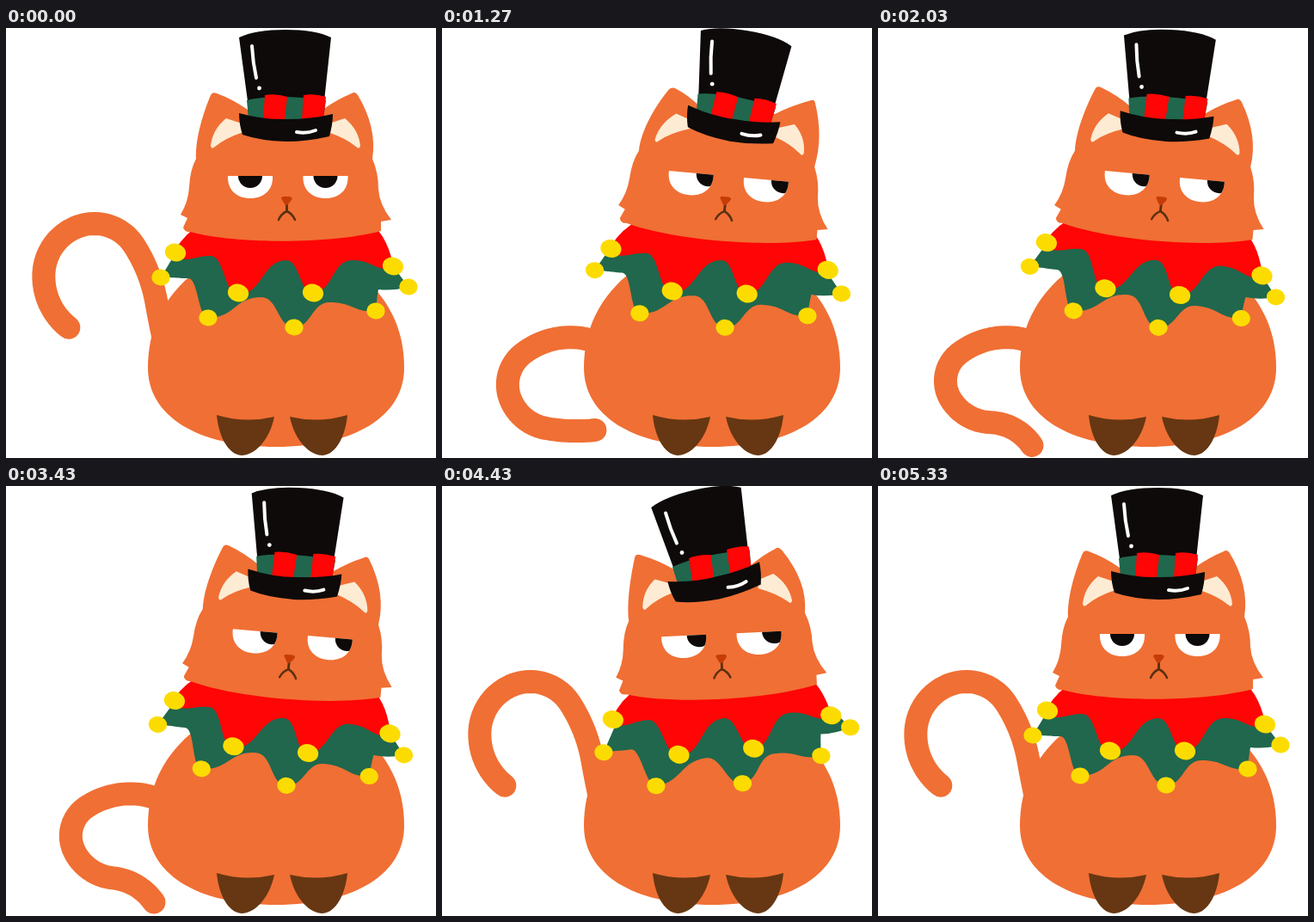
An HTML page with a canvas that plays this animation: 500x500 px, repeating every 5.86 s.

```html
<!DOCTYPE html>
<html lang="en">
<head>
<meta charset="utf-8">
<title>Grumpy festive cat</title>
<style>
  html, body { margin: 0; width: 100%; height: 100%; overflow: hidden; background: #fff; }
  canvas { display: block; width: 100vw; height: 100vh; }
</style>
</head>
<body>
<canvas id="stage" width="500" height="500"></canvas>
<script>
const ctx = document.getElementById('stage').getContext('2d');
const LOOP = 5860, STEP = 1900 / 27;
const ORANGE = '#f06f34', BLACK = '#0d0a09', RED = '#ff0505', GREEN = '#20674d',
      YELLOW = '#fcdc00', CREAM = '#fdebd3', BROWN = '#663712', NOSE = '#c63c06', MOUTH = '#5a3010';

const mix = (a, b, u) => a + (b - a) * u;

// The motion is stepped and rests between its two halves.
function poseTime(t) {
  if (t < 570) return 0;
  if (t >= 2030 && t < 3430) return 2030;
  if (t >= 5330) return 5330;
  const start = t < 2030 ? 570 : 3430;
  return start + Math.floor((t - start + 4) / STEP) * STEP;
}

function poseAt(t) {
  const ramp = (from, to) => {
    const u = Math.min(1, Math.max(0, (t - from) / (to - from)));
    return u * u * (3 - 2 * u);
  };
  const bump = (from, peak, to) => ramp(from, peak) - ramp(peak, to);
  const look = ramp(500, 1200) - ramp(3360, 4230);
  const overshoot = bump(700, 1270, 1800);
  const rebound = bump(3900, 4430, 5330);
  const settle = ramp(3900, 4430);
  return {
    head: 5.2 * look - 2.7 * rebound,
    ears: 12 * overshoot - 7 * rebound,
    hatTilt: 2.8 * look + 6.9 * overshoot - 12.6 * rebound,
    hatX: 10.5 * look + 3.5 * overshoot - 9.5 * rebound,
    gaze: 20 * (ramp(500, 1200) - ramp(4200, 5200)),
    collarTop: 5.1 * (ramp(700, 2030) - settle) - 4.7 * rebound,
    collarHem: 4.9 * (ramp(500, 1770) - settle) - 8 * rebound,
    tailDrop: ramp(500, 1270) - ramp(3360, 3930),
    tailCurl: bump(600, 1270, 1770) + 0.4 * bump(3430, 3930, 4430),
    tailLength: 362 - 76 * (ramp(500, 900) - ramp(3430, 4100))
  };
}

const still = (x, y) => [x, y];
const mirror = axis => (x, y) => [2 * axis - x, y];
const chain = (first, second) => (x, y) => second(...first(x, y));
function turn(degrees, cx, cy) {
  const a = degrees * Math.PI / 180, c = Math.cos(a), s = Math.sin(a);
  return (x, y) => [cx + (x - cx) * c - (y - cy) * s, cy + (x - cx) * s + (y - cy) * c];
}

// Segments of 2, 4 or 6 numbers are lines, quadratics or cubics.
function trace(warp, start, ...segments) {
  ctx.beginPath();
  ctx.moveTo(...warp(...start));
  for (const s of segments) {
    const p = [];
    for (let i = 0; i < s.length; i += 2) p.push(...warp(s[i], s[i + 1]));
    if (p.length === 2) ctx.lineTo(...p);
    else if (p.length === 4) ctx.quadraticCurveTo(...p);
    else ctx.bezierCurveTo(...p);
  }
}
function fill(color, warp, ...path) {
  trace(warp, ...path);
  ctx.fillStyle = color;
  ctx.fill();
}
function stroke(color, width, warp, ...path) {
  trace(warp, ...path);
  ctx.strokeStyle = color;
  ctx.lineWidth = width;
  ctx.stroke();
}
function ellipse(color, x, y, rx, ry = rx, angle = 0) {
  ctx.beginPath();
  ctx.ellipse(x, y, rx, ry, angle, 0, 7);
  ctx.fillStyle = color;
  ctx.fill();
}

// S-curves through crests and dips, level at each of them.
const wave = points => points.slice(1).map(([x, y], i) => {
  const [px, py] = points[i], mid = (px + x) / 2;
  return [mid, py, mid, y, x, y];
});

// Headings in degrees, evenly spaced from base to tip.
const tailUp = [104, 100, 123, 199, 267, 322];
const tailDown = [142, 182, 218, 300, 358, 304];
const tipCurl = [0, 0, 0, -10, -8, 62];

function drawTail({ tailDrop, tailCurl, tailLength }) {
  const headings = tailUp.map((up, i) => mix(up, tailDown[i], tailDrop) + tailCurl * tipCurl[i]);
  const parts = headings.length - 1, count = 60;
  let x = mix(190, 200, tailDrop), y = mix(390, 377, tailDrop);
  const line = [[x, y]];
  for (let n = 0; n < count; n++) {
    const s = (n + 0.5) / count * parts, i = Math.floor(s);
    const a = mix(headings[i], headings[i + 1], s - i) * Math.PI / 180;
    x += Math.cos(a) * tailLength / count;
    y -= Math.sin(a) * tailLength / count;
    line.push([x, y]);
  }
  stroke(ORANGE, 27, still, ...line);
}

function drawBody() {
  for (const side of [still, mirror(314)])
    fill(ORANGE, side, [315, 270], [222, 282], [183, 312, 165, 350, 165, 395], [165, 450, 220, 487, 315, 487]);
  for (const side of [still, mirror(321)])
    fill(BROWN, side, [245, 450], [278, 460, 312, 452], [306, 481, 288, 497, 274, 497], [257, 496, 247, 472, 245, 450]);
}

function drawCollar({ collarTop, collarHem }) {
  const top = turn(collarTop, 326, 243), hem = turn(collarHem, 326, 243);
  const hemEdge = [[180, 290], [212, 291], [235, 337], [297, 313], [335, 348], [376, 319], [430, 330]];
  const redEdge = [[450, 281], [402, 270], [357, 308], [326, 270], [270, 310], [238, 265], [205, 269]];
  fill(GREEN, hem, [197, 262], hemEdge[0], ...wave(hemEdge), [431, 315, 433, 304],
    [450, 306, 468, 301], [450, 277], [330, 220, 197, 262]);
  fill(RED, top, [197, 258], [208, 238, 230, 226], [420, 225], [441, 236, 450, 274], redEdge[0], ...wave(redEdge));
  for (const bell of [[180, 290], [235, 337], [335, 348], [430, 329], [468, 301]])
    ellipse(YELLOW, ...hem(...bell), 10.7, 9.5, 0.1);
  for (const bell of [[197, 261], [270, 308], [357, 308], [450, 277]])
    ellipse(YELLOW, ...top(...bell), 12.2, 10.4, 0.25);
}

function drawEye(x, gaze, warp) {
  ctx.save();
  fill('#fff', warp, [x - 26, 172], [x + 26, 172], [x + 27, 188, x + 16, 198, x, 198], [x - 16, 198, x - 27, 188, x - 26, 172]);
  ctx.clip();
  ellipse(BLACK, ...warp(x + gaze, 172), 14);
  ctx.restore();
}

function drawHead({ head, ears, gaze }) {
  const bend = (x, y) => [x + ears * (Math.max(0, 150 - y) / 75) ** 2, y];
  const warp = chain(bend, turn(head, 326, 235));
  fill(ORANGE, warp, [238, 78], [230, 97, 220, 128, 221, 152], [214, 165, 213, 185], [212, 202, 203, 217],
    [211, 221], [206, 232], [208, 238, 214, 237], [270, 252, 380, 251, 436, 236], [436, 225], [448, 223],
    [434, 205, 433, 187], [433, 168, 426, 152], [430, 128, 424, 103, 409, 78], [406, 73, 402, 76],
    [385, 83, 368, 95], [281, 95], [264, 83, 245, 76], [240, 74, 238, 78]);
  for (const side of [still, mirror(325)])
    fill(CREAM, chain(side, warp), [256, 105], [240, 118, 238, 137], [239, 142, 243, 138], [255, 128, 276, 121], [274, 111], [265, 108, 256, 105]);
  drawEye(284, gaze, warp);
  drawEye(371.5, gaze, warp);
  for (const side of [still, mirror(326.5)])
    stroke(MOUTH, 2.5, chain(side, warp), [326.5, 205], [326.5, 213], [320, 216, 317, 223]);
  fill(NOSE, warp, [320, 198], [320, 196, 323, 196], [330, 196], [334, 197, 332, 200], [328, 205], [326, 207, 324, 205]);
}

function drawHat({ hatTilt, hatX }) {
  const warp = chain(turn(hatTilt, 325.5, 101), (x, y) => [x + hatX, y]);
  fill(BLACK, warp, [271, 11], [290, 2, 325, 2], [360, 2, 378, 11], [370, 85], [368, 110], [284, 110], [281, 85]);
  fill(GREEN, warp, [280, 84], [313, 76, 372, 84], [369, 106], [282, 106]);
  for (const x of [301, 346])
    fill(RED, warp, [x, 78], [x + 13, 76, x + 26, 80], [x + 23, 107], [x - 2, 107]);
  fill(BLACK, warp, [271, 99], [300, 107, 327, 106], [355, 106, 380, 100], [380, 112, 376, 126], [350, 132, 326, 132], [295, 131, 275, 124], [271, 112, 271, 99]);
  stroke('#fff', 4, warp, [286, 21], [287, 40, 291, 58]);
  stroke('#fff', 4, warp, [338, 121], [350, 123, 360, 119]);
  ellipse('#fff', ...warp(294.5, 70), 2.4);
}

function draw(now) {
  const pose = poseAt(poseTime(now % LOOP));
  ctx.fillStyle = '#fff';
  ctx.fillRect(0, 0, 500, 500);
  ctx.lineCap = ctx.lineJoin = 'round';
  drawTail(pose);
  drawBody();
  drawCollar(pose);
  drawHead(pose);
  drawHat(pose);
}

const began = performance.now();
function tick() {
  draw(performance.now() - began);
  requestAnimationFrame(tick);
}
tick();
</script>
</body>
</html>
```
